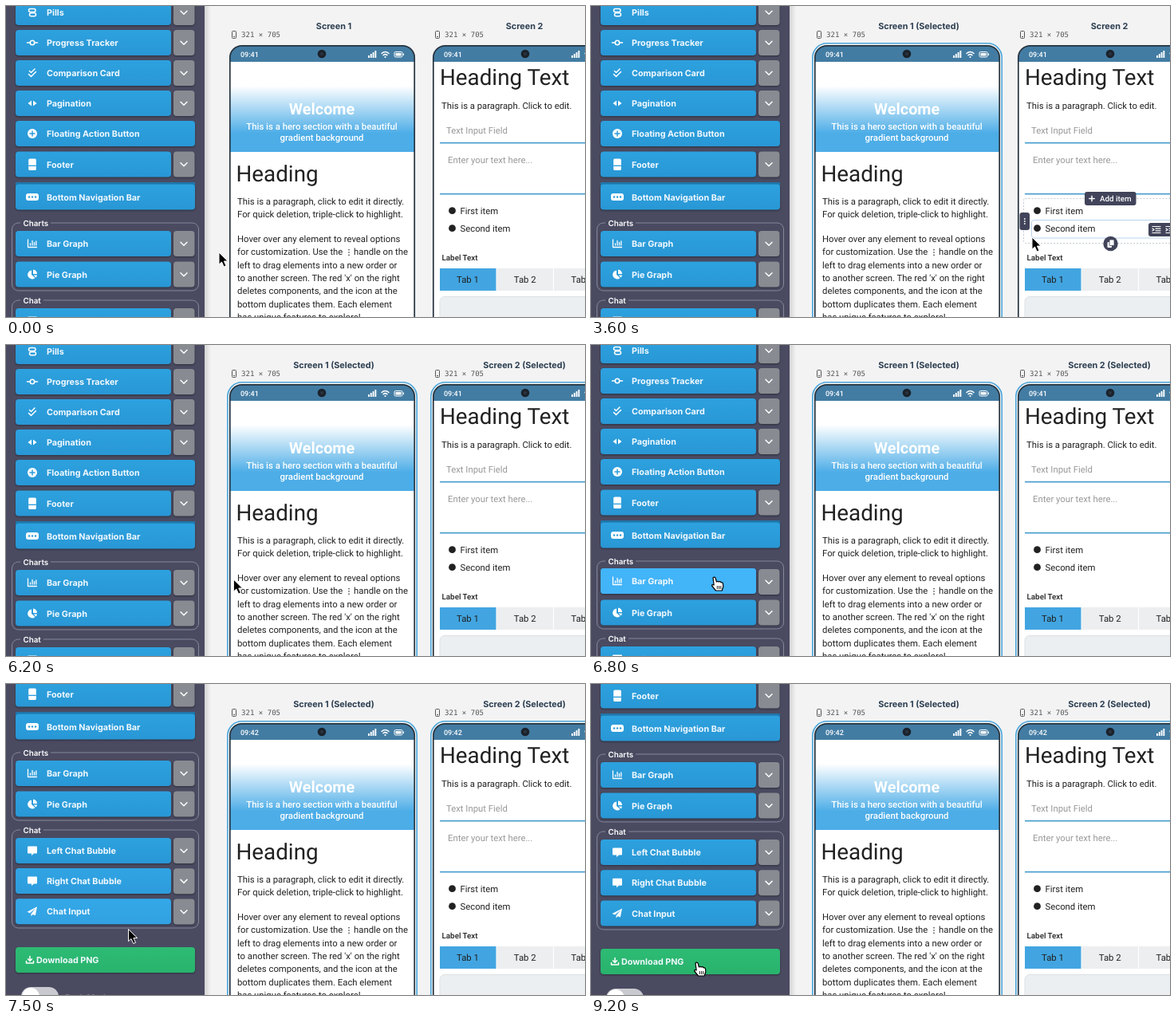
An HTML page that plays this animation: 726x390 px, repeating every 9400 ms.

```html
<!DOCTYPE html>
<html lang="en">
<head>
<meta charset="utf-8">
<title>Screen builder</title>
<style>
html, body { margin: 0; width: 100%; height: 100%; overflow: hidden; background: #f3f3f4; }
svg { display: block; width: 726px; height: 390px; text-rendering: geometricPrecision; }
text { font: 400 11.32px Roboto, sans-serif; fill: #212121; white-space: pre; }
.btn { font: 700 10.75px Inter, sans-serif; fill: #f2f9fe; }
.legend { font: 600 9.8px Inter, sans-serif; fill: #fff; }
.title { font: 700 10.8px Inter, sans-serif; fill: #2c3e50; text-anchor: middle; }
.mono { font: 9.05px "DejaVu Sans Mono", monospace; fill: #555; }
.clock { font-weight: 500; font-size: 9px; fill: #fff; }
.h1 { font-size: 27.8px; }
.welcome { font-weight: 700; font-size: 19.8px; fill: #fff; text-anchor: middle; }
.sub { font-weight: 500; font-size: 11.38px; fill: #fff; text-anchor: middle; }
.hint { fill: #999; }
.label { font-weight: 500; font-size: 9.8px; }
.tab { text-anchor: middle; }
.light { fill: #fff; }
.dim { fill: #85869a; }
.line { fill: none; stroke: #fff; stroke-width: 1.5; stroke-linecap: round; stroke-linejoin: round; }
.raised { filter: drop-shadow(0 1px 1.3px rgba(0, 0, 0, .4)); }
</style>
</head>
<body>
<svg id="stage" viewBox="0 0 726 390"></svg>
<script>
const LOOP = 9400, STEP = 100;

const text = (x, y, s, cls = '') => `<text x="${x}" y="${y}" class="${cls}">${s}</text>`;
const rect = (x, y, w, h, fill, r = 0, more = '') =>
  `<rect x="${x}" y="${y}" width="${w}" height="${h}" rx="${r}" fill="${fill}" ${more}/>`;
const dot = (x, y, r, fill = '#fff', more = '') => `<circle cx="${x}" cy="${y}" r="${r}" fill="${fill}" ${more}/>`;
const line = (d, more = '') => `<path class="line" d="${d}" ${more}/>`;
const solid = (d, fill = '#fff') => `<path d="${d}" fill="${fill}"/>`;
const group = (x, y, body, more = '') => `<g transform="translate(${x} ${y})" ${more}>${body}</g>`;

// Icons are centred on 0,0
const icons = {
  pills: line('M-2.5 -4.5H2A2 2 0 0 1 2 -.5H-2.5A2 2 0 0 1 -2.5 -4.5ZM-1.5 .8H2.5A2 2 0 0 1 2.5 4.8H-1.5A2 2 0 0 1 -1.5 .8Z'),
  progress: line('M-6.5 0H-3M3 0H6.5') + dot(0, 0, 2.7, 'none', 'stroke="#fff" stroke-width="1.6"'),
  compare: line('M-3.5 -2.5L-1.5 -.5L3 -5M-4.5 1.5L-1.5 4.5L4.5 -1.5'),
  pages: solid('M-1 -3.5V3.5L-5.5 0ZM1 -3.5V3.5L5.5 0Z'),
  plus: dot(0, 0, 6) + line('M-3 0H3M0 -3V3', 'style="stroke:#2b9cda"'),
  footer: rect(-4.8, -7, 9.6, 14.5, '#fff', 1.5) + rect(-4.8, 1.2, 9.6, 1.3, '#2b9cda'),
  nav: rect(-8, -4.5, 16, 9, '#fff', 3) + [-4, 0, 4].map(x => dot(x, 0, 1.2, '#2b9cda')).join(''),
  bars: line('M-5.5 -5V4.5H5.5M-2.5 2V0M0 2V-3.5M2.5 2V-1.5M4.8 2V-3', 'style="stroke-width:1.3"'),
  pie: solid('M-1 -5A5.5 5.5 0 1 0 3.5 4.4L-1 .5ZM1 -6A5.5 5.5 0 0 1 6 -.5H1ZM1.5 1H6A5.5 5.5 0 0 1 4.6 4Z'),
  bubble: solid('M-5 -5.5H5Q6 -5.5 6 -4.5V2.5Q6 3.5 5 3.5H2L-1 6V3.5H-5Q-6 3.5 -6 2.5V-4.5Q-6 -5.5 -5 -5.5Z'),
  plane: solid('M6 -6L-6.5 .5L-3 2L4 -4L-1.5 3V6L.5 3.8L3.8 5Z')
};

// label, centre y, icon, has a drop-down
const items = [
  ['Pills', 8, 'pills', 1],
  ['Progress Tracker', 46, 'progress', 1],
  ['Comparison Card', 84, 'compare', 1],
  ['Pagination', 122, 'pages', 1],
  ['Floating Action Button', 160, 'plus', 0],
  ['Footer', 198.5, 'footer', 1],
  ['Bottom Navigation Bar', 239.5, 'nav', 0],
  ['Bar Graph', 298, 'bars', 1],
  ['Pie Graph', 336.5, 'pie', 1],
  ['Left Chat Bubble', 395, 'bubble', 1],
  ['Right Chat Bubble', 433.2, 'bubble', 1],
  ['Chat Input', 471.5, 'plane', 1]
];
const download = ['Download PNG', 532, '', 0];

function button([label, y, icon, menu]) {
  const w = menu ? 195 : 225;
  const edge = icon === 'nav' ? rect(12, -18.5, w, 6, '#1f78ad', 1) : '';
  const more = menu
    ? rect(210, -16, 26.5, 32, '#898b92', 4, 'class="raised"') + line('M219 -1.8L223 2.2L227 -1.8')
    : '';
  return group(0, y, more + `<g class="face">${edge}${rect(12, -16, w, 32, 'url(#blue)', 4, 'class="raised"')}
    ${rect(12, -16, w, 32, '#42b4f8', 4, 'class="glow" opacity="0"')}
    ${group(33, 0, icons[icon])}${text(51, 4, label, 'btn')}</g>`);
}

const fieldset = (label, top, bottom, w) =>
  rect(7.5, top, 234, bottom - top, 'none', 8, 'stroke="#85879a"') +
  rect(18, top - 3, w, 6, '#4a4b61') + text(21.5, top + 3.5, label, 'legend');

const sidebar = fieldset('Charts', 272, 357, 38) + fieldset('Chat', 369, 492, 29) +
  items.map(button).join('') +
  group(0, download[1], rect(12, -16, 225, 32, 'url(#green)', 4, 'class="raised"') +
    line('M30 -4.5V1M27.5 -1.2L30 1.5L32.5 -1.2M25.5 1.5V4H34.5V1.5') + text(38, 4, download[0], 'btn')) +
  rect(19, 566, 47, 24, '#c9cad0', 12) + dot(31, 578, 11) +
  text(74, 583, 'Dark Mode', 'btn dim');

// Phone shell, drawn at the left phone's place
const shell = (body, id) =>
  rect(277.8, 46.8, 237.4, 500, 'none', 18, `id="ring${id}" stroke="#4ba6da" stroke-width="1.6"`) +
  rect(281, 50, 231, 500, '#fff', 15) +
  solid('M281 70V65A15 15 0 0 1 296 50H497A15 15 0 0 1 512 65V70Z', '#437ca3') +
  text(294, 64, '09:41', 'clock') + dot(396, 60, 5.3, '#1b222b') + dot(396, 60, 2, '#2b3440') +
  [0, 1, 2, 3].map(i => rect(454 + i * 2.8, 62 - i * 2, 1.9, 3 + i * 2, '#fff')).join('') +
  line('M471 59.5Q475.5 55.5 480 59.5M473 61.8Q475.5 59.5 478 61.8') + dot(475.5, 64, 1.1) +
  rect(487, 57.5, 10, 6.5, 'none', 1.5, 'stroke="#fff"') + rect(488.5, 59, 7, 3.5, '#fff') + rect(498, 59.5, 1, 2.5, '#fff') +
  body + rect(280.8, 49.8, 231.4, 500, 'none', 15, 'stroke="#26343f" stroke-width="1.7"') +
  rect(283.5, 31.5, 5, 9, 'none', 1, 'stroke="#555"') + rect(285, 38, 2, 1, '#555') +
  text(295, 39, '321 × 705', 'mono');

const lines = ['Hover over any element to reveal options', 'for customization. Use the',
  'left to drag elements into a new order or', "to another screen. The red 'x' on the right",
  'deletes components, and the icon at the', 'bottom duplicates them. Each element',
  'has unique features to explore!'];
const dots3 = (x, y, gap, r, fill) => [-gap, 0, gap].map(d => dot(x, y + d, r, fill)).join('');

const first = rect(281, 100, 231, 83, 'url(#hero)') + text(396, 136, 'Welcome', 'welcome') +
  text(396, 154.5, 'This is a hero section with a beautiful', 'sub') + text(396, 168.5, 'gradient background', 'sub') +
  text(288.5, 219.5, 'Heading', 'h1') +
  text(290, 249, 'This is a paragraph, click to edit it directly.') +
  text(290, 265.3, 'For quick deletion, triple-click to highlight.') +
  lines.map((s, i) => text(290, 296 + i * 16.35, s)).join('') +
  text(436, 312.35, 'handle on the') + dots3(430, 309, 3.2, .8, '#212121');

const tab = (i, fill) => rect(544 + i * 71.5, 329, 70.5, 28, fill) + text(579 + i * 71.7, 346.7, `Tab ${i + 1}`, 'tab');
const second = text(544, 99, 'Heading Text', 'h1') +
  text(546, 128.5, 'This is a paragraph. Click to edit.') +
  text(552, 160.3, 'Text Input Field', 'hint') + rect(544, 170.8, 215, 1.7, '#4a9fcf') +
  text(554, 197.3, 'Enter your text here...', 'hint') + rect(544, 234.8, 215, 1.7, '#4a9fcf') +
  dot(559.5, 256.7, 4.4, '#212121') + text(569.5, 260.5, 'First item') +
  dot(559.5, 278.7, 4.4, '#212121') + text(569.5, 282.5, 'Second item') +
  text(546.5, 319, 'Label Text', 'label') +
  tab(0, '#42a5e1') + tab(1, '#eceeef') + tab(2, '#eceeef') +
  rect(544, 364.5, 215, 60, '#eceff1', 6, 'stroke="#dde1e4"');

const listTools = rect(542.5, 241.5, 216, 56, 'none', 2, 'stroke="#c3cad1" stroke-dasharray="2 2"') +
  rect(552.5, 268.5, 206, 22.5, 'none', 3, 'stroke="#b9d3ec"') +
  rect(619, 233, 64.5, 17, '#41445a', 3) + line('M624.8 241.5H631.2M628 238.3V244.7') +
  text(638, 245, 'Add item', 'light label') +
  rect(537.5, 259, 12.5, 22, '#41445a', 3) + dots3(543.8, 270, 3, .9, '#fff') +
  rect(699, 272, 60, 17, '#41445a', 3) +
  [704, 721].map(x => line(`M${x} 276.5h10M${x + 4} 279.2h6M${x + 4} 281.8h6M${x} 284.5h10M${x} 279l2 1.5l-2 1.5`, 'style="stroke-width:1.2"')).join('') +
  dot(651.5, 298, 9.2, '#41445a') + rect(647.5, 296, 5.5, 7, '#fff', 1) +
  rect(650, 293, 6, 7.5, '#fff', 1, 'stroke="#41445a" stroke-width=".8"');

const gradient = (id, a, b, end = 1) =>
  `<linearGradient id="${id}" x2="0" y2="1"><stop stop-color="${a}"/><stop offset="${end}" stop-color="${b}"/></linearGradient>`;
const stage = document.getElementById('stage');
stage.innerHTML = `<defs>${gradient('blue', '#2da1df', '#2997d5')}${gradient('green', '#2dbb74', '#29b36d')}
  ${gradient('hero', '#fff', '#4dade7', .72)}
  <linearGradient id="shade"><stop stop-opacity=".13"/><stop offset="1" stop-opacity="0"/></linearGradient></defs>
  ${rect(0, 0, 726, 390, '#f3f3f4')}${rect(249, 0, 8, 390, 'url(#shade)')}${rect(0, 0, 249, 390, '#4a4b61')}
  <g id="side">${sidebar}</g>
  ${shell(first, 1)}${group(255, 0, shell('', 2))}${second}
  ${text(411, 29, '', 'title')}${text(650, 29, '', 'title')}
  <g id="tools">${listTools}</g>
  <g id="arrow"><path d="M0 0V15.2L3.5 12L6.2 18L9 16.8L6.4 11H11.2Z" fill="#000" stroke="#fff"/></g>
  <g id="hand"><path d="M-2 0Q0 -2 1.2 .5L2.4 5Q4 3.6 5.3 5Q7 4 8 5.8Q10.2 5.2 10.5 7.5L10.8 11L9.2 16H1.5L-3.4 10Q-3.6 7.8 -.8 9Z"
    fill="#fff" stroke="#000" stroke-width="1.2" stroke-linejoin="round"/><path d="M3.3 10V14M5.6 10V14M7.8 10V14" stroke="#000" stroke-width=".9"/></g>`;

const $ = id => document.getElementById(id);
const faces = [...document.querySelectorAll('.face')];
const titles = document.querySelectorAll('.title');
const clocks = document.querySelectorAll('.clock');
const show = (id, on) => $(id).setAttribute('visibility', on ? 'visible' : 'hidden');

const pointerKeys = [[0, 267, 309], [1100, 267, 309], [2000, 309, 275], [2800, 309, 275], [3500, 553, 290],
  [4000, 553, 290], [4400, 550, 298], [5800, 550, 298], [6450, 155, 292], [6850, 155, 292],
  [7150, 153.5, 307.5], [8100, 153.5, 307.5], [9000, 133, 350]];
const scrollKeys = [[6700, 0], [6800, 1], [7400, 186], [7600, 186], [7900, 184]];

// Eased values of a key list at time t
function at(keys, t) {
  const i = keys.findIndex(k => k[0] > t);
  if (i === 0) return keys[0].slice(1);
  if (i < 0) return keys.at(-1).slice(1);
  const a = keys[i - 1], b = keys[i], u = (t - a[0]) / (b[0] - a[0]), e = u * u * (3 - 2 * u);
  return a.slice(1).map((v, k) => v + (b[k + 1] - v) * e);
}

function over([, y, , menu], t) {
  const [px, py] = at(pointerKeys, t), [scroll] = at(scrollKeys, t);
  return px > 12 && px < (menu ? 207 : 237) && Math.abs(py + scroll - y) < 16;
}

// Hover fades over the last 300 ms
const glow = (item, t) => [0, 1, 2, 3, 4, 5].filter(k => over(item, t - k * 60)).length / 6;

function draw(t) {
  const [x, y] = at(pointerKeys, t), [scroll] = at(scrollKeys, t);
  $('side').setAttribute('transform', `translate(0 ${-scroll})`);
  faces.forEach((face, i) => {
    const g = glow(items[i], t);
    face.setAttribute('transform', `translate(0 ${-g})`);
    face.querySelector('.glow').setAttribute('opacity', g);
  });
  [2500, 4600].forEach((when, i) => {
    const on = t >= when;
    titles[i].textContent = `Screen ${i + 1}${on ? ' (Selected)' : ''}`;
    show(`ring${i + 1}`, on);
  });
  clocks.forEach(c => c.textContent = t < 7200 ? '09:41' : '09:42');
  show('tools', t >= 3400 && t < 4200);
  const pointing = [...items, download].some(item => over(item, t));
  show('hand', pointing);
  show('arrow', !pointing);
  for (const id of ['hand', 'arrow']) $(id).setAttribute('transform', `translate(${x} ${y})`);
}

const start = performance.now();
function tick() {
  const t = (performance.now() - start) % LOOP;
  draw(Math.min(Math.floor(t / STEP) * STEP, 9200));
  requestAnimationFrame(tick);
}
tick();
</script>
</body>
</html>
```
